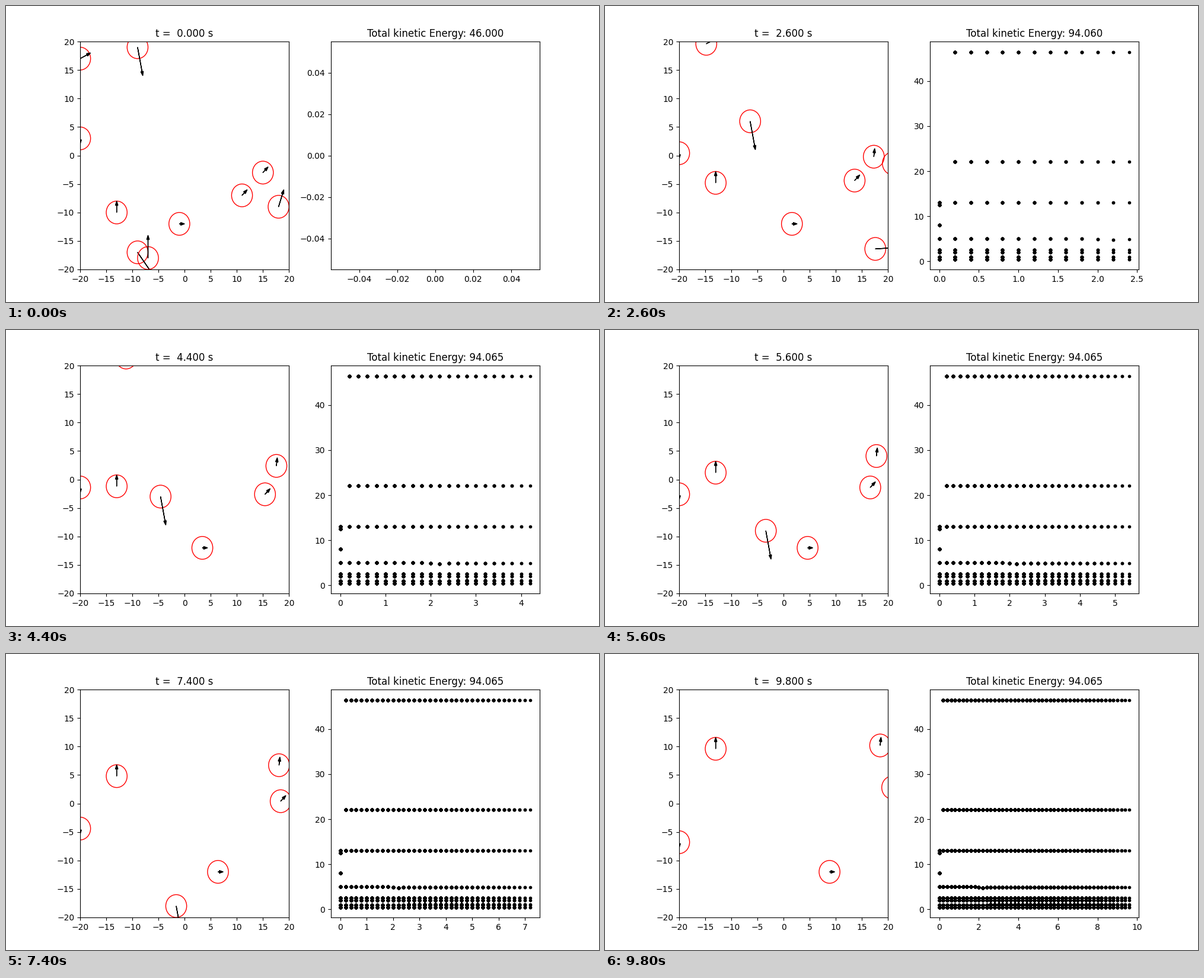
These frames come from a looping animation (1000 by 500 pixels, 10000 ms). A matplotlib script:

```python
import numpy as np
import matplotlib.pyplot as plt
from matplotlib.animation import FuncAnimation

FRAMES = 50
FRAME_TIME = 0.2      # seconds of simulated and real time per frame
DT = 0.001
STEPS = round(FRAME_TIME / DT)
RADIUS = 2
STIFFNESS = 20

# x, y, vx, vy
BALLS = np.array([
    [-20, 17, 2, 1],
    [-9, 19, 1, -5],
    [-20, 3, 0, -1],
    [-13, -10, 0, 2],
    [-9, -17, 3, -4],
    [-7, -18, 0, 4],
    [-1, -12, 1, 0],
    [11, -7, 1, 1],
    [15, -3, 1, 1],
    [18, -9, 1, 3],
], dtype=float)


def contact_forces(pos):
    """Soft repulsion, cubic in the overlap of each touching pair."""
    gap = pos[:, None] - pos[None, :]
    dist = np.sqrt((gap ** 2).sum(axis=2)) + np.eye(len(pos)) * 100
    overlap = np.maximum(2 * RADIUS - dist, 0)
    return ((STIFFNESS * overlap ** 3 / dist)[..., None] * gap).sum(axis=1)


def simulate():
    pos, vel = BALLS[:, :2].copy(), BALLS[:, 2:].copy()
    path, speeds = [], []
    for _ in range(FRAMES):
        path.append(pos.copy())
        speeds.append(vel.copy())
        for _ in range(STEPS):
            vel += DT * contact_forces(pos)
            pos += DT * vel
    return np.array(path), np.array(speeds)


positions, velocities = simulate()
times = np.arange(FRAMES) * FRAME_TIME
energies = 0.5 * (velocities ** 2).sum(axis=2)
count = len(BALLS)

fig, (box, chart) = plt.subplots(1, 2, figsize=(10, 5), dpi=100)
box.set_xlim(-20, 20)
box.set_ylim(-20, 20)

circles, arrows = [], []
for x, y, vx, vy in BALLS:
    circles.append(box.add_patch(
        plt.Circle((x, y), RADIUS, fill=False, edgecolor="red")))
    arrows.append(box.arrow(x, y, vx, vy, head_width=0.5, color="black",
                            length_includes_head=True))
dots, = chart.plot([], [], "k.")


def update(frame):
    for circle, arrow, (x, y), (vx, vy) in zip(
            circles, arrows, positions[frame], velocities[frame]):
        circle.center = x, y
        arrow.set_data(x=x, y=y, dx=vx, dy=vy)

    # Older dots are stamped once per elapsed frame, so their edges darken.
    stamps = np.repeat(np.arange(frame, 0, -1), count)
    dots.set_data(np.repeat(np.repeat(times[:frame], count), stamps),
                  np.repeat(energies[:frame].ravel(), stamps))
    chart.relim()
    chart.autoscale_view()

    box.set_title(f"t = {times[frame]:6.3f} s")
    chart.set_title(f"Total kinetic Energy: {energies[frame].sum():.3f}")
    return [*circles, *arrows, dots]


anim = FuncAnimation(fig, update, frames=FRAMES, interval=200,
                     repeat=True, repeat_delay=0, blit=False)
plt.show()
```
